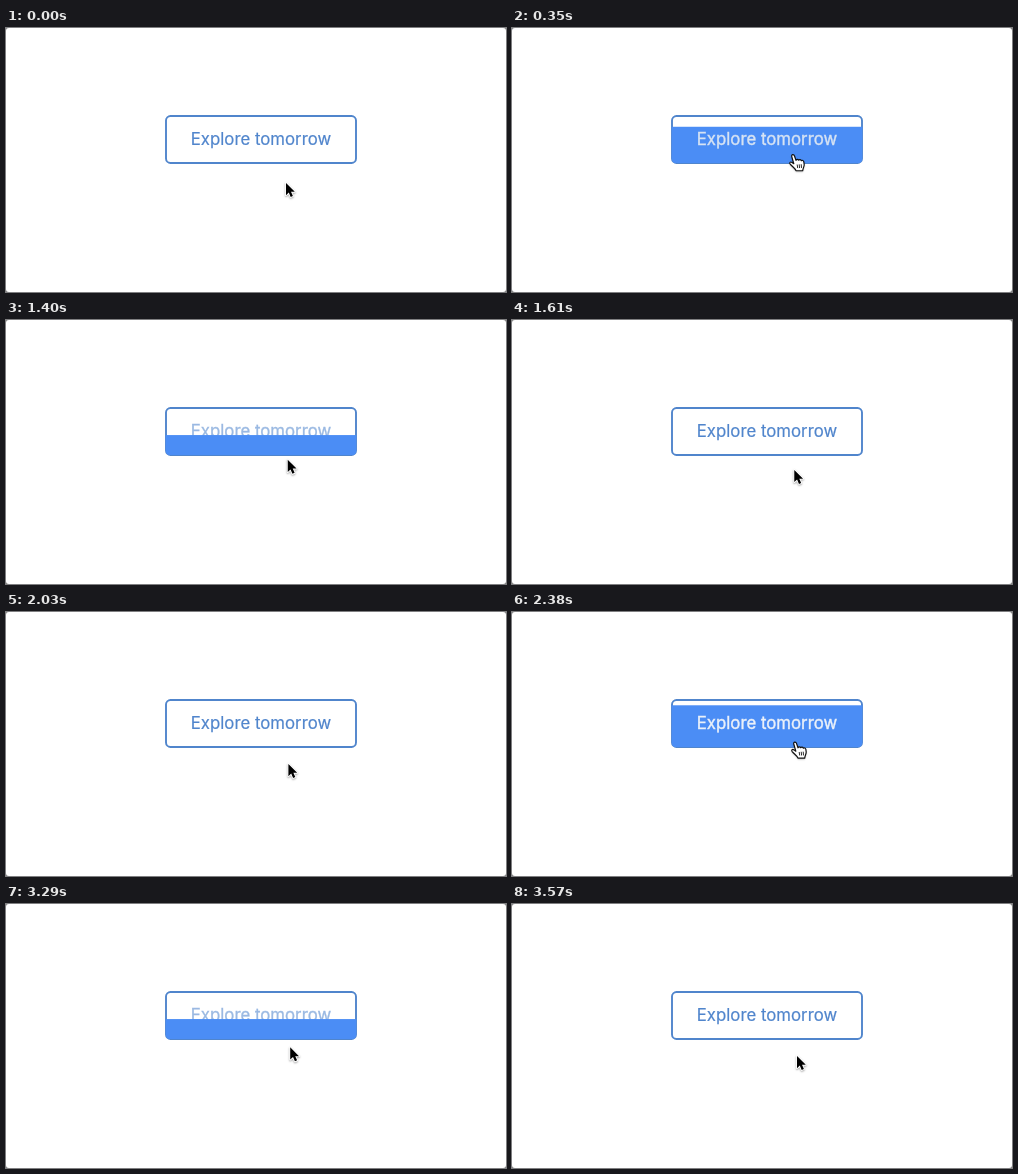
Write an HTML page with a canvas that moves like this. It is 500 px wide and 264 px high and loops after 3640 ms.

```html
<!DOCTYPE html>
<html lang="en">
<head>
<meta charset="utf-8">
<title>Button hover</title>
<style>
  html, body { margin: 0; width: 100%; height: 100%; overflow: hidden; background: #fff; }
  canvas { display: block; width: 500px; height: 264px; }
</style>
</head>
<body>
<canvas id="stage" width="500" height="264"></canvas>
<script>
const ctx = document.getElementById('stage').getContext('2d');
const LOOP = 3640, STEP = 70, FADE = 300;
const LINE = [80, 133, 204], WHITE = [255, 255, 255], FILL = '#4b8df5';
const BOX = { x: 159, y: 87, w: 192, h: 49 };
const LABEL = 'Explore tomorrow';

// The pointer glides in and out of the button; the hover state flips on the way.
const START = { x: 280, y: 155 };
const GLIDES = [
  { from: 0, until: 370, flip: 209, x: 281, y: 126.5 },
  { from: 1050, until: 1730, flip: 1300, x: 282.4, y: 152 },
  { from: 2030, until: 2400, flip: 2199, x: 283, y: 130 },
  { from: 3010, until: 3500, flip: 3190, x: 285, y: 152 }
];

const clamp = v => Math.min(1, Math.max(0, v));
const mix = (a, b, k) => a + (b - a) * k;
const smooth = k => k * k * (3 - 2 * k);
const rgb = c => `rgb(${c.map(Math.round).join(',')})`;
const bezier = (a, b, s) => 3 * a * s * (1 - s) ** 2 + 3 * b * s * s * (1 - s) + s ** 3;

// CSS "ease" timing
function ease(x) {
  let lo = 0, hi = 1;
  for (let i = 0; i < 24; i++) {
    const mid = (lo + hi) / 2;
    if (bezier(0.25, 0.25, mid) < x) lo = mid; else hi = mid;
  }
  return bezier(0.1, 1, lo);
}

function stateAt(t) {
  let { x, y } = START, inside = false, amount = 0;
  for (const glide of GLIDES) {
    const k = smooth(clamp((t - glide.from) / (glide.until - glide.from)));
    x = mix(x, glide.x, k);
    y = mix(y, glide.y, k);
    if (t >= glide.flip) {
      inside = !inside;
      const done = ease(clamp((t - glide.flip) / FADE));
      amount = inside ? done : 1 - done;
    }
  }
  return { x, y, inside, amount };
}

function roundBox(inset, radius) {
  ctx.beginPath();
  ctx.roundRect(BOX.x + inset, BOX.y + inset, BOX.w - 2 * inset, BOX.h - 2 * inset, radius);
}

function drawFill(amount) {
  const height = (BOX.h - 2) * amount;
  ctx.save();
  roundBox(0.7, 4.5);
  ctx.clip();
  ctx.fillStyle = FILL;
  ctx.fillRect(BOX.x, BOX.y + BOX.h - 1 - height, BOX.w, height);
  ctx.restore();
}

function drawLabel(amount) {
  ctx.font = '400 16.8px Inter, sans-serif';
  ctx.textAlign = 'center';
  ctx.fillStyle = ctx.strokeStyle = rgb(LINE.map((v, i) => mix(v, WHITE[i], amount)));
  ctx.lineWidth = mix(0.2, 0.45, amount);
  ctx.fillText(LABEL, 255, 117);
  ctx.strokeText(LABEL, 255, 117);
}

function drawButton({ inside, amount }) {
  roundBox(1, 4.5);
  ctx.lineWidth = 1.9;
  ctx.strokeStyle = rgb(LINE);
  ctx.stroke();
  if (!inside) drawLabel(amount);
  drawFill(amount);
  if (inside) drawLabel(amount);
}

const ARROW = new Path2D('M0 0V12.2L2.8 9.6 4.7 14 6.9 13 5 8.8H8.8Z');
const HAND = new Path2D(
  'M-1.3 1.6C-1.6-.4 .9-.6 1.5 1.2L3 5.6C3.5 4.4 5.1 4.4 5.7 5.5' +
  ' 6.4 4.6 7.9 4.8 8.4 6 9.2 5.3 10.5 5.8 10.8 7L11.2 9.6C11.4 11.8 10 13 9.7 16H3' +
  'C2.6 13.8-.6 12-2.8 9.4-4 7.9-2.6 6.6-1 7.7L.8 9Z');
const CREASES = new Path2D('M4.2 9.8L4.7 13.3M6.2 9.6L6.6 13.3M8.2 9.5L8.5 13.2');

function drawPointer({ x, y, inside }) {
  ctx.save();
  ctx.translate(x, y);
  ctx.lineJoin = 'round';
  ctx.shadowColor = 'rgba(0,0,0,.35)';
  ctx.shadowBlur = 2;
  ctx.shadowOffsetY = 1;
  ctx.strokeStyle = ctx.fillStyle = '#fff';
  if (inside) {
    ctx.fill(HAND);
    ctx.shadowColor = 'transparent';
    ctx.strokeStyle = '#111';
    ctx.lineWidth = 1.2;
    ctx.stroke(HAND);
    ctx.lineWidth = 0.9;
    ctx.stroke(CREASES);
  } else {
    ctx.lineWidth = 1.8;
    ctx.stroke(ARROW);
    ctx.shadowColor = 'transparent';
    ctx.fillStyle = '#000';
    ctx.fill(ARROW);
  }
  ctx.restore();
}

function draw(now) {
  const state = stateAt(Math.floor((now % LOOP) / STEP) * STEP);
  ctx.fillStyle = '#808080';
  ctx.fillRect(0, 0, 500, 264);
  ctx.fillStyle = '#fff';
  ctx.beginPath();
  ctx.roundRect(0, 0, 500, 264, 3);
  ctx.fill();
  drawButton(state);
  drawPointer(state);
}

const start = performance.now();
function tick() {
  draw(performance.now() - start);
  requestAnimationFrame(tick);
}
tick();
</script>
</body>
</html>
```
